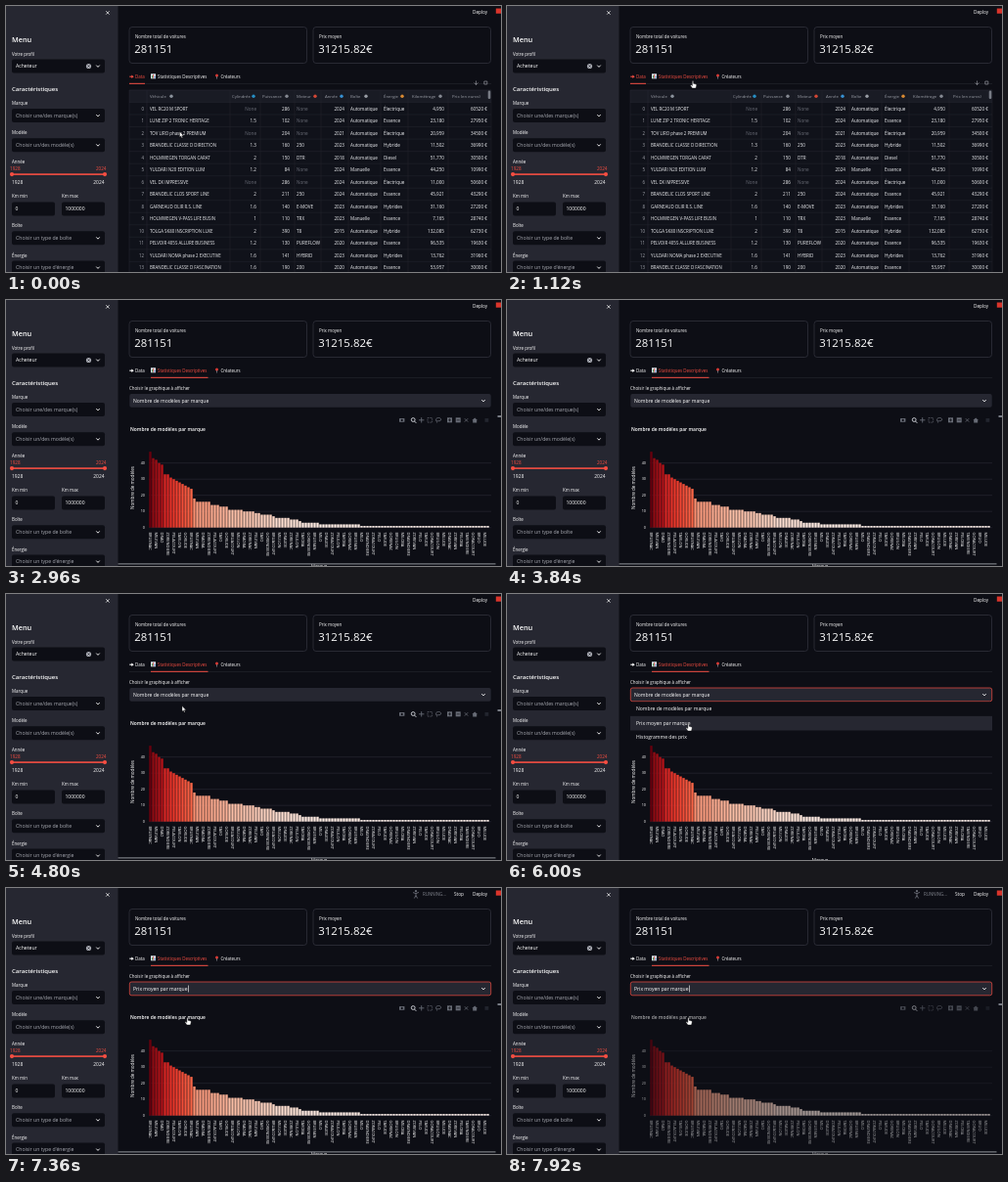
An HTML page for the animation above (8000 ms loop, 506 by 272 pixels).

```html
<!DOCTYPE html>
<html lang="fr">
<head>
<meta charset="utf-8">
<style>
html, body { margin: 0; width: 100%; height: 100%; overflow: hidden; background: #0d0e15; }
svg { display: block; width: 506px; height: 272px; font-family: "Open Sans", "Noto Sans", sans-serif; }
</style>
</head>
<body>
<svg id="stage" viewBox="0 0 506 272"></svg>
<script>
const LOOP = 8000;
const WHITE = '#fff', MUTED = '#a8aab2', DIM = '#6a6d77', RED = '#f64e42', DARK = '#0d0e15', PANEL = '#262731', LINE = '#30323c';

const text = (x, y, s, size = 4.45, fill = WHITE, extra = '') =>
  `<text x="${x}" y="${y}" font-size="${size}" fill="${fill}" ${extra}>${s}</text>`;
const rect = (x, y, w, h, fill, extra = '') =>
  `<rect x="${x}" y="${y}" width="${w}" height="${h}" fill="${fill}" ${extra}/>`;
const path = (d, stroke, w = 0.7, extra = 'fill="none"') =>
  `<path d="${d}" stroke="${stroke}" stroke-width="${w}" ${extra}/>`;
const dot = (x, y, r, fill) => `<circle cx="${x}" cy="${y}" r="${r}" fill="${fill}"/>`;
const group = (id, body) => `<g id="${id}">${body}</g>`;
const chevron = (x, y) => path(`M${x - 1.7} ${y - 0.9}l1.7 1.8 1.7-1.8`, WHITE, 0.9);
const BOLD = 'font-weight="600"', END = 'text-anchor="end"', MID = 'text-anchor="middle"';

function sidebar() {
  const select = (label, y, value, fill = MUTED) =>
    text(6, y, label) + rect(6, y + 4, 95, 14, DARK, 'rx="2"') +
    text(10, y + 12.7, value, 5.15, fill) + chevron(94, y + 11);
  const number = (x, label, value) =>
    text(x, 196, label) + rect(x, 200.5, 44, 14, DARK, 'rx="2"') + text(x + 3.5, 209.3, value, 5);
  return rect(0, 0, 114.5, 272, PANEL) +
    path('M102.2 5.2l3.4 3.4m0-3.4l-3.4 3.4', WHITE, 0.7) +
    text(6, 36.5, 'Menu', 7.3, WHITE, BOLD) +
    select('Votre profil', 50.5, 'Acheteur', WHITE) +
    dot(84.5, 61.5, 2.6, MUTED) + path('M83.5 60.5l2 2m0-2l-2 2', DARK, 0.6) +
    text(6, 87.3, 'Caractéristiques', 6, WHITE, BOLD) +
    select('Marque', 101, 'Choisir une/des marque(s)') +
    select('Modèle', 131.3, 'Choisir un/des modèle(s)') +
    text(6, 161, 'Année') +
    text(4, 168, '1928', 4.6, RED) + text(102.5, 168, '2024', 4.6, RED, END) +
    rect(6, 171.3, 95, 1.6, RED) + dot(6, 172.1, 2.1, RED) + dot(101, 172.1, 2.1, RED) +
    text(6, 182.3, '1928', 4.9) + text(100.5, 182.3, '2024', 4.9, WHITE, END) +
    number(6, 'Km min', '0') + number(57, 'Km max', '1000000') +
    select('Boîte', 226.3, 'Choisir un type de boîte') +
    select('Énergie', 256.5, "Choisir un type d'énergie");
}

function header() {
  const card = (x, label, value) =>
    rect(x, 21.5, 181.5, 37, 'none', `rx="3" stroke="${LINE}" stroke-width=".8"`) +
    text(x + 6, 33, label) + text(x + 5.3, 48.3, value, 11.4);
  return text(477, 8.4, 'Deploy', 4.7) + rect(500.8, 2.5, 5.2, 5.2, '#d9342b') +
    group('running',
      dot(419, 3.2, 1.1, DIM) + path('M416 4.6l3 1 3-1.2M419 5v2.5l-1.6 3M419 7.5l1.6 3', DIM, 0.9) +
      text(426, 8.4, 'RUNNING...', 4.4, '#858891') + text(458, 8.4, 'Stop', 4.7)) +
    card(126, 'Nombre total de voitures', '281151') +
    card(314, 'Prix moyen', '31215.82€') +
    path('M126 79.5H496', '#262730', 0.6) +
    group('tabData', path('M126.3 72.2h2.6', 'currentColor', 1.1) +
      path('M128.3 70.4l2.4 1.8-2.4 1.8z', 'none', 0, 'fill="currentColor"') +
      text(132, 73.7, 'Data', 4.45, 'currentColor')) +
    rect(148, 69.3, 5, 5, '#dce6ee') + rect(149, 71, 0.9, 2.7, '#3f9a54') +
    rect(150.3, 70, 0.9, 3.7, '#d8443c') + rect(151.6, 71.7, 0.9, 2, '#3277c8') +
    group('tabStats', text(155, 73.7, 'Statistiques Descriptives', 4.45, 'currentColor')) +
    dot(215.5, 71, 1.5, '#d83a35') + path('M215.5 72v2.6', '#b9bcc4', 0.5) +
    text(219.5, 73.7, 'Créateurs') +
    rect(126, 78.8, 16, 1, RED, 'id="underline"');
}

const A = 'Automatique', M = 'Manuelle', EL = 'Électrique', ES = 'Essence', HY = 'Hybride', NO = 'None';
const rows = [
  ['VEL RC20 M SPORT', NO, 286, NO, 2024, A, EL, '4,950', 60520],
  ['LUNE ZIP 2 TRONIC HERITAGE', 1.5, 102, NO, 2024, A, ES, '23,180', 27950],
  ['TOV LIRO phase 2 PREMIUM', NO, 204, NO, 2021, A, EL, '20,959', 34500],
  ['BRANDELIC CLASSE D DIRECTION', 1.3, 160, 250, 2023, A, HY, '11,502', 36990],
  ['HOLMWEGEN TORGAN CARAT', 2, 150, 'DTR', 2018, A, 'Diesel', '51,770', 30500],
  ['YULDARI N20 EDITION LUM', 1.2, 84, NO, 2024, M, ES, '44,250', 10990],
  ['VEL DX IMPRESSIVE', NO, 286, NO, 2024, A, EL, '11,000', 50600],
  ['BRANDELIC CLOS SPORT LINE', 2, 211, 250, 2024, A, ES, '45,921', 43290],
  ['GARNEAUD OLIR R.S. LINE', 1.6, 140, 'E-MOVE', 2023, A, HY + 's', '31,160', 27200],
  ['HOLMWEGEN V-PASS LIFE BUSIN', 1, 110, 'TRX', 2023, M, ES, '7,165', 28740],
  ['TOLGA SK80 INSCRIPTION LUXE', 2, 390, 'T8', 2015, A, HY, '132,085', 62730],
  ['PELVOIR 405S ALLURE BUSINESS', 1.2, 130, 'PUREFLOW', 2020, A, ES, '96,535', 19630],
  ['YULDARI NOMA phase 2 EXECUTIVE', 1.6, 141, 'HYBRID', 2023, A, HY + 's', '13,762', 31960],
  ['BRANDELIC CLASSE D FASCINATION', 1.6, 190, 200, 2020, A, ES, '53,957', 30000],
];
// heading, heading x, icon x, icon colour, value x, right-aligned, right border
const columns = [
  ['Véhicule', 147, 169, '#8b929c', 147, 0, 229],
  ['Cylindrée', 231, 253, '#268ec4', 256, 1, 260],
  ['Puissance', 262, 287, '#858992', 290, 1, 295],
  ['Moteur', 297, 316, '#d54735', 297, 0, 322],
  ['Année', 326, 343, '#3790d2', 346, 1, 350],
  ['Boîte', 352, 368, '#999da5', 352, 0, 383],
  ['Énergie', 386, 405, '#d98a32', 386, 0, 411],
  ['Kilométrage', 415, 444, '#858992', 448, 1, 452],
  ['Prix (en euros)', 456, 467, '#b99b55', 492, 1, 496],
];

function table() {
  let s = rect(126, 86, 370, 186, '#10121a') + rect(126, 86, 370, 12.5, '#191b24') +
    path('M478.5 78.5l2 2 2-2M480.5 76.5v4M488.8 77h3v3h-3z', MUTED, 0.6);
  for (let i = 0; i <= 14; i++) s += path(`M126 ${98.5 + i * 12.53}H496`, '#24262f', 0.5);
  s += path('M126 272V86H496M144 86V272', '#292b35', 0.5);
  for (const [name, x, iconX, color, , , edge] of columns) {
    s += path(`M${edge} 86V272`, '#24262f', 0.5);
    s += text(x, 93.9, name, 4.3, '#9a9da6');
    if (x < 456) s += dot(iconX, 92.3, 1.7, color);
  }
  rows.forEach((row, i) => {
    const y = 106.5 + i * 12.53;
    s += text(141, y, i, 4.4, MUTED, END);
    row.forEach((v, j) => {
      const [, , , , x, right] = columns[j];
      s += text(x, y, j == 8 ? v + ' €' : v, j ? 4.6 : 4.4, v === NO ? DIM : '#f2f3f6', right ? END : '');
    });
  });
  return s + rect(492.7, 86.5, 2.6, 8.5, '#777b84', 'rx="1.2"');
}

const counts = [47, 43, 42, 40, 39, 33, 33, 31, 30, 29, 28, 27, 26, 25, 24, 18, 16, 16, 16, 16, 16, 14, 14, 14, 13,
  13, 13, 11, 11, 11, 11, 11, 10, 10, 10, 10, 9, 9, 8, 8, 8, 8, 7, 6, 6, 6, 6, 6, 5, 5, 5, 4];
const countAt = i => counts[i] || (i < 58 ? 3 : i < 72 ? 2 : 1);
const reds = ['fff5f0', 'fee0d2', 'fcbba1', 'fc9272', 'fb6a4a', 'ef3b2c', 'cb181d', 'a50f15', '67000d']
  .map(c => [0, 2, 4].map(k => parseInt(c.substr(k, 2), 16)));
function shade(f) {
  const k = Math.min(7, Math.floor(f * 8)), r = f * 8 - k;
  return `rgb(${reds[k].map((c, n) => Math.round(c + (reds[k + 1][n] - c) * r))})`;
}

function chart() {
  const BARS = 116, STEP = 3, BASE = 232.7, UNIT = 1.65;
  const heads = ['BRU', 'TAV', 'ZOR', 'MIL', 'GOR', 'PEL', 'DRA'];
  const tails = ['ENAC', 'ILON', 'UDE', 'ACOURT', 'O', 'ENDIERE', 'EVAN', 'OBA'];
  let s = text(127, 133.6, 'Nombre de modèles par marque', 4.9, WHITE, BOLD);
  for (let v = 0; v <= 40; v += 10) {
    const y = BASE - v * UNIT;
    s += path(`M146 ${y}H496`, '#2b2d38', 0.6) + text(142, y + 1.2, v, 3.8, WHITE, END);
  }
  s += text(0, 0, 'Nombre de modèles', 4.6, WHITE, `${MID} transform="translate(131 192) rotate(-90)"`);
  for (let i = 0; i < BARS; i++) {
    const v = countAt(i), x = 146.3 + i * STEP;
    s += rect(x, BASE - v * UNIT, 2.4, v * UNIT, shade(v / 47));
    if (i % 2 == 0) {
      const name = heads[i * 5 % 7] + tails[i * 11 % 61 % 8];
      s += text(0, 0, name, 4, WHITE, `transform="translate(${x - 0.2} 237.5) rotate(90)"`);
    }
  }
  return s + text(320, 273.5, 'Marque', 4.6, WHITE, MID);
}

function toolbar() {
  const G = '#676b75';
  return rect(402, 121, 5.4, 3.8, G, 'rx=".6"') + dot(404.7, 122.9, 1.1, DARK) +
    path('M417.6 124.1l1.7 1.7', '#d7dae0', 1) +
    `<circle cx="416.2" cy="122.5" r="1.9" fill="none" stroke="#d7dae0" stroke-width=".9"/>` +
    path('M422 122.8h5.4M424.7 120.1v5.4', G, 0.9) +
    path('M431 120.5h4.6v4.6h-4.6z', G, 0.7, 'fill="none" stroke-dasharray="1 .6"') +
    path('M440.5 125.5c.3-1.5-1.3-1.6-1-3.3.6-2.4 5-2.2 5.2 0 .1 1.6-2.8 2-4.4 1.2', G, 0.8) +
    rect(451, 120.3, 5, 5, G) + path('M452 122.8h3M453.5 121.3v3', DARK, 0.7) +
    rect(459.7, 120.3, 5, 5, G) + path('M460.7 122.8h3', DARK, 0.7) +
    path('M468.8 121.2l3.4 3.4m0-3.4l-3.4 3.4', G, 0.8) +
    path('M476.4 123l2.8-2.6 2.8 2.6h-.8v2.4h-4V123z', 'none', 0, `fill="${G}"`) +
    rect(489.5, 121, 3.8, 3.8, '#22252e');
}

function stats() {
  const option = (s, i) => text(132, 119.2 + i * 14.4, s, 5.05);
  return group('plot', chart() + toolbar()) +
    text(126, 91.7, 'Choisir le graphique à afficher') +
    rect(126.3, 96, 369.4, 13.8, PANEL, 'id="box" rx="2" stroke-width=".7"') +
    text(130, 104.8, '', 5.05, WHITE, 'id="choice"') +
    rect(186.3, 99.5, 0.6, 7, WHITE, 'id="caret"') + chevron(488, 103) +
    group('menu', rect(126, 110.5, 370, 43.8, DARK, 'rx="2"') +
      rect(126, 0, 370, 14.6, PANEL, 'id="hover"') +
      ['Nombre de modèles par marque', 'Prix moyen par marque', 'Histogramme des prix'].map(option).join(''));
}

const arrow = path('M0 0V5.6L1.3 4.5 2.2 6.6 3.1 6.2 2.2 4.2H4z', '#111', 0.4, 'fill="#fff"');
const hand = path('M-.6 0Q0-.8.6 0V2.3L3.2 3Q3.9 3.3 3.7 4.2L3 7H-.6L-2.5 4.3Q-2.4 3.4-1.5 3.8L-.6 4.6z',
  '#111', 0.4, 'fill="#fff"');

const stage = document.getElementById('stage');
stage.innerHTML = rect(0, 0, 506, 272, DARK) + header() + group('table', table()) + group('stats', stats()) +
  sidebar() + group('scroll', rect(114.5, 269.2, 386, 1.3, '#72757c') + rect(502.5, 118, 3.5, 2, '#777b84')) +
  group('cursor', group('arrow', arrow) + group('hand', hand));
const el = {};
stage.querySelectorAll('[id]').forEach(n => el[n.id] = n);

const show = (n, on) => n.style.display = on ? '' : 'none';
const within = (t, a, b) => t >= a && t < b;
const track = [[0, 177.5, 128.5], [250, 177.5, 128.5], [1000, 190, 77], [1950, 190, 77], [2550, 300, 290],
  [3900, 300, 290], [4550, 180, 114.5], [4900, 180, 114.5], [5250, 182, 102], [5450, 182, 102],
  [5850, 185.5, 133], [LOOP, 185.5, 133]];
function pointer(t) {
  const k = track.findIndex(p => p[0] > t), [a, x, y] = track[k - 1], [b, u, v] = track[k];
  const f = (t - a) / (b - a), e = f * f * (3 - 2 * f);
  return [x + (u - x) * e, y + (v - y) * e];
}

function draw(t) {
  const onStats = t >= 1150, chosen = t >= 6250, [x, y] = pointer(t);
  show(el.table, !onStats);
  show(el.stats, onStats);
  el.tabData.style.color = onStats ? WHITE : RED;
  el.tabStats.style.color = onStats || t > 900 ? RED : WHITE;
  el.underline.setAttribute('x', onStats ? 148 : 126);
  el.underline.setAttribute('width', onStats ? 58.5 : 16);
  el.box.setAttribute('stroke', t >= 5400 ? RED : 'none');
  el.choice.textContent = chosen ? 'Prix moyen par marque' : 'Nombre de modèles par marque';
  show(el.caret, chosen);
  show(el.menu, within(t, 5400, 6250));
  el.hover.setAttribute('y', 110.5 + 14.4 * Math.max(0, Math.floor((y - 110.5) / 14.4)));
  show(el.running, t >= 7000);
  el.plot.style.opacity = 1 - 0.67 * Math.min(1, Math.max(0, (t - 7350) / 1000));
  show(el.scroll, within(t, 2400, 5100) || t >= 7300);
  const pointing = within(t, 850, 2050) || t >= 5150;
  show(el.hand, pointing);
  show(el.arrow, !pointing);
  el.cursor.setAttribute('transform', `translate(${x} ${y})`);
}

function tick() {
  draw(performance.now() % LOOP);
  requestAnimationFrame(tick);
}
tick();
</script>
</body>
</html>
```
